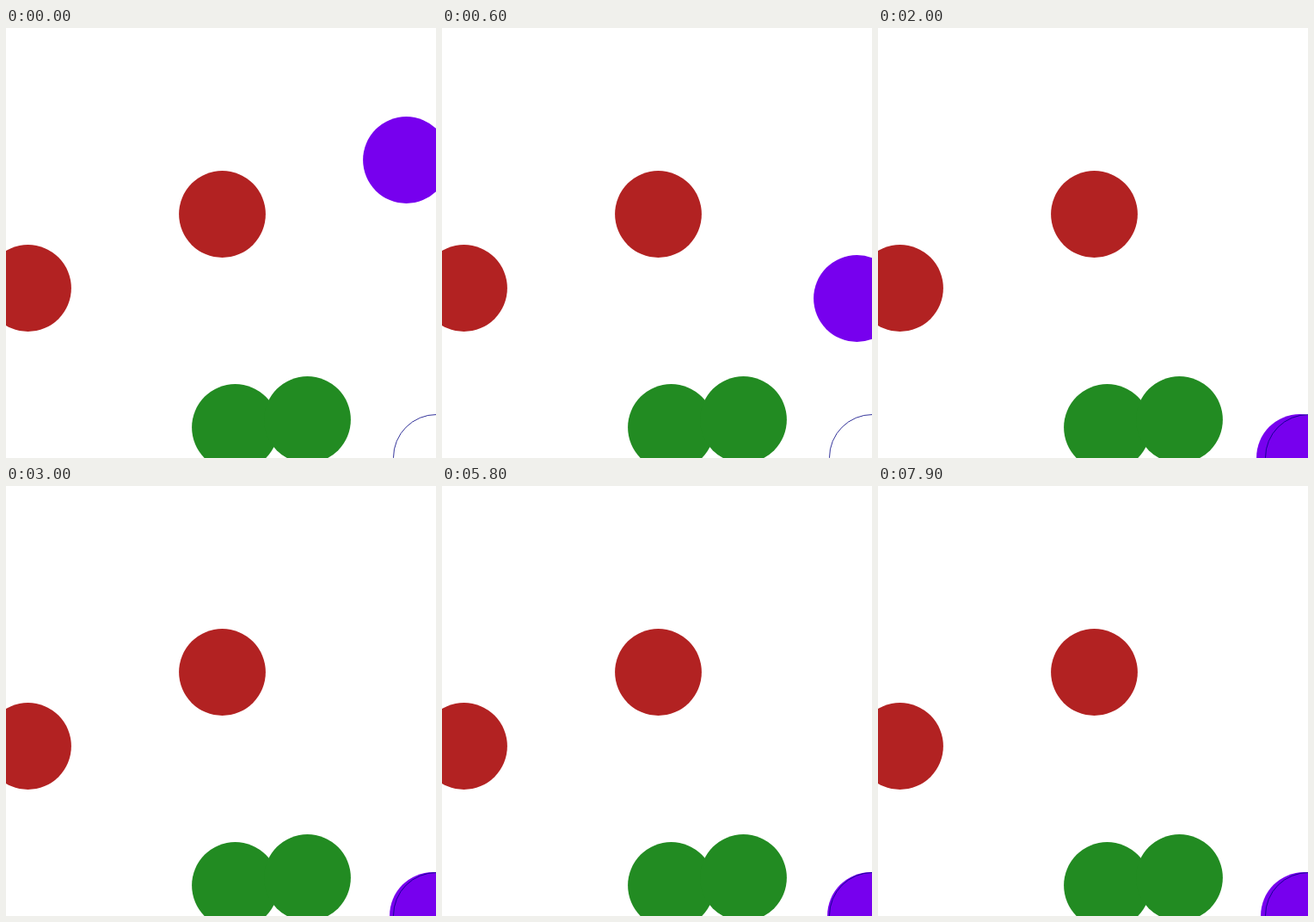
An HTML page that plays this animation: 500x500 px, repeating every 8 s.

```html
<!DOCTYPE html>
<html lang="en">
<head>
<meta charset="utf-8">
<title>Falling ball</title>
<style>
  html, body { margin: 0; width: 100%; height: 100%; overflow: hidden; background: #fff; }
  svg { display: block; width: 500px; height: 500px; }
  .red { fill: #b22222; }
  .green { fill: #228b22; }
  #ball { fill: #7700ee; }
  #goal { fill: none; stroke: #000080; stroke-width: 0.8; }
</style>
</head>
<body>
<svg viewBox="0 0 500 500">
  <circle class="red" cx="25.5" cy="302.5" r="50.4"/>
  <circle class="red" cx="251.5" cy="216.5" r="50.4"/>
  <circle class="green" cx="266.5" cy="464.5" r="50.4"/>
  <circle class="green" cx="350.5" cy="455.5" r="50.4"/>
  <circle id="ball" cx="465.5" cy="153.5" r="50.4"/>
  <circle id="goal" cx="500.5" cy="499.5" r="50"/>
</svg>
<script>
  const STEP = 100, STEPS = 80, LANDING = 10, FLOOR = 499.5;
  const ball = document.getElementById('ball');

  // Turning points of the sway along the floor: [step, centre x]
  const turns = [
    [LANDING, 500.5], [23, 488.5], [33, 498.6], [39, 485.5],
    [63, 499.7], [76, 490.5], [STEPS, 496.5]
  ];

  const ease = f => (1 - Math.cos(Math.PI * f)) / 2;
  const snap = v => Math.floor(v) + 0.5;

  function sway(n) {
    const i = turns.findIndex(([step]) => step > n);
    const [n0, x0] = turns[i - 1], [n1, x1] = turns[i];
    return x0 + (x1 - x0) * ease((n - n0) / (n1 - n0));
  }

  // Uniform acceleration until the ball reaches the floor.
  const fall = n => [
    465.5 + 1.833 * n + 0.1667 * n * n,
    153.5 + 13.17 * n + 2.278 * n * n
  ];

  const start = performance.now();
  function draw(now) {
    const n = Math.floor(Math.max(0, now - start) / STEP) % STEPS;
    const [x, y] = n < LANDING ? fall(n) : [sway(n), FLOOR];
    ball.setAttribute('cx', snap(x));
    ball.setAttribute('cy', snap(y));
    requestAnimationFrame(draw);
  }
  draw(start);
</script>
</body>
</html>
```
